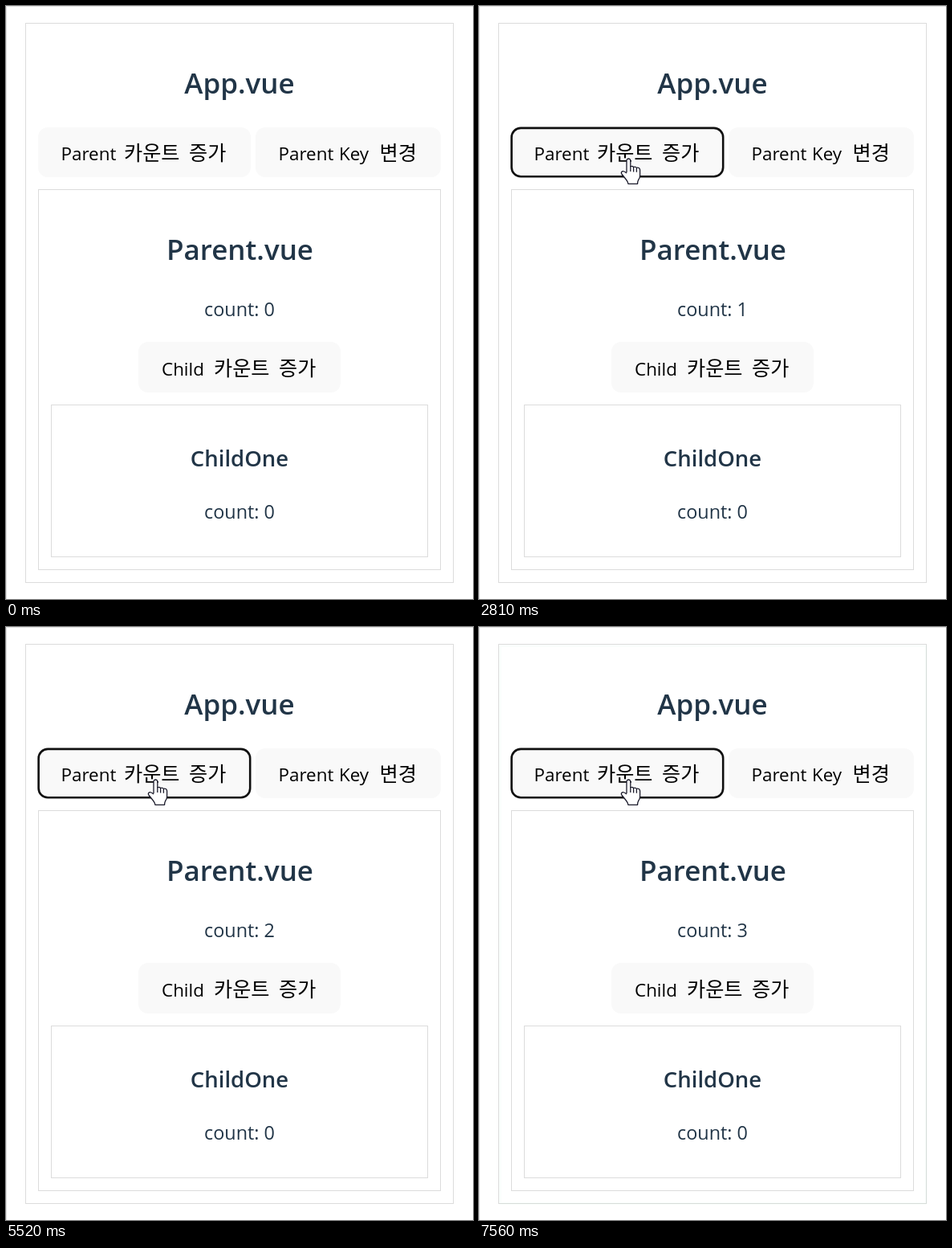
An HTML page that plays this animation: 582x738 px, repeating every 8 s.

```html
<!DOCTYPE html>
<html lang="ko">
<head>
<meta charset="utf-8">
<style>
  html, body { margin: 0; width: 100%; height: 100%; overflow: hidden; background: #fff; }
  svg { display: block; }
  text { font: 23.4px "Open Sans", "Noto Sans", sans-serif; fill: #213547; text-anchor: middle; }
  .h2 { font-size: 35px; font-weight: 600; }
  .h3 { font-size: 27.5px; font-weight: 600; }
  .label text { font-size: 22.4px; fill: #000; text-anchor: start; }
  .label .ko { font: 25.2px "Noto Sans CJK KR", "Noto Sans CJK", sans-serif; }
  .box { fill: none; stroke: #dcdcdc; }
  .button { fill: #f9f9f9; }
  .flash { fill: none; stroke: #42b883; stroke-width: 3; }
  .cursor { fill: #fff; stroke: #1b1b2b; stroke-width: 1.3; stroke-linejoin: round; }
</style>
</head>
<body>
<svg width="582" height="738" viewBox="0 0 582 738">
  <path d="M.5 738V.5H582" fill="none" stroke="#e2e2e2"/>
  <rect class="box" x="24.5" y="21.5" width="533" height="696"/>
  <rect class="box" x="40.5" y="228.5" width="501" height="473"/>
  <rect class="box" x="56.5" y="496.5" width="469" height="189"/>
  <rect class="button" x="40" y="151" width="265" height="62" rx="12"/>
  <rect class="button" x="311" y="151" width="231" height="62" rx="12"/>
  <rect class="button" x="165" y="418" width="252" height="63" rx="12"/>
  <rect id="hover" x="40.75" y="151.75" width="263.5" height="60.5" rx="11.5" fill="none" stroke="#646cff" stroke-width="1.5"/>
  <rect id="focus" x="40.6" y="151.9" width="263.6" height="60.4" rx="11.5" fill="none" stroke="#101010" stroke-width="2.6"/>

  <text class="h2" x="291" y="109">App.vue</text>
  <text class="h2" x="291.5" y="316">Parent.vue</text>
  <text id="count" x="291" y="386"></text>
  <text class="h3" x="291" y="573">ChildOne</text>
  <text x="291" y="638">count: 0</text>
  <g class="label">
    <text x="68.5" y="192">Parent</text>
    <text class="ko" x="147" y="192">카운트</text>
    <text class="ko" x="228" y="192">증가</text>
    <text x="339.5" y="192">Parent</text>
    <text x="415" y="192">Key</text>
    <text class="ko" x="465.5" y="192">변경</text>
    <text x="194" y="460">Child</text>
    <text class="ko" x="259" y="460">카운트</text>
    <text class="ko" x="340" y="460">증가</text>
  </g>

  <rect id="parentFlash" class="flash" x="41.5" y="230.5" width="499" height="471" rx="2"/>
  <rect id="appFlash" class="flash" x="26.5" y="23.5" width="531" height="694" rx="2"/>

  <circle id="press" cx="186" cy="190" r="18" fill="#ff0" fill-opacity=".47"/>
  <g id="pointer">
    <path id="arrow" class="cursor" d="M0 0V24.5L5.6 19.2 9.3 27.6 13 26 9.4 17.8H17.3Z"/>
    <path id="hand" class="cursor" d="M-2 17V2.4a2.4 2.4 0 0 1 4.8 0V10q2-1.5 3.8.5 2.2-1.2 3.8.8 3.6-.8 4.2 2.5V21q0 3-2 5.5-1 2-1 4.8H0q-.5-2.8-3-5.8L-8.2 19q-1.2-2.2.8-3.2 2-.8 5.4 2.2M2.8 9v7M6.6 10.5v6M10.4 11.3v5.5"/>
  </g>
</svg>
<script>
const LOOP = 8000;
const clicks = [
  { down: 1370, up: 1470, app: 2050 },
  { down: 4030, up: 4230, app: 4700 },
  { down: 6180, up: 6320, app: 6870 }
];
const get = id => document.getElementById(id);
const clamp = v => Math.min(1, Math.max(0, v));
const show = (id, opacity) => get(id).setAttribute('opacity', +opacity);

// Starts at full strength, then fades to nothing.
function fade(t, key, duration, power) {
  return Math.max(...clicks.map(c =>
    t < c[key] ? 0 : clamp(1 - (t - c[key]) / duration) ** power));
}

function draw(t) {
  const p = clamp((t - 480) / 630);
  const k = p * p * (3 - 2 * p);
  const x = 403 - 217 * k, y = 78 + 112 * k;
  const over = x < 305 && y > 151;
  const focused = t >= clicks[0].down;

  get('pointer').setAttribute('transform', `translate(${x} ${y})`);
  show('pointer', t >= 500);
  show('arrow', !over);
  show('hand', over);
  show('hover', focused ? 0 : clamp((t - 850) / 250));
  show('focus', focused);
  show('press', clicks.some(c => t >= c.down && t < c.up));
  show('parentFlash', fade(t, 'up', 420, 1));
  show('appFlash', fade(t, 'app', 750, 1.5));
  get('count').textContent = 'count: ' + clicks.filter(c => t >= c.up).length;
}

const start = performance.now();
function tick() {
  draw((performance.now() - start) % LOOP);
  requestAnimationFrame(tick);
}
tick();
</script>
</body>
</html>
```
